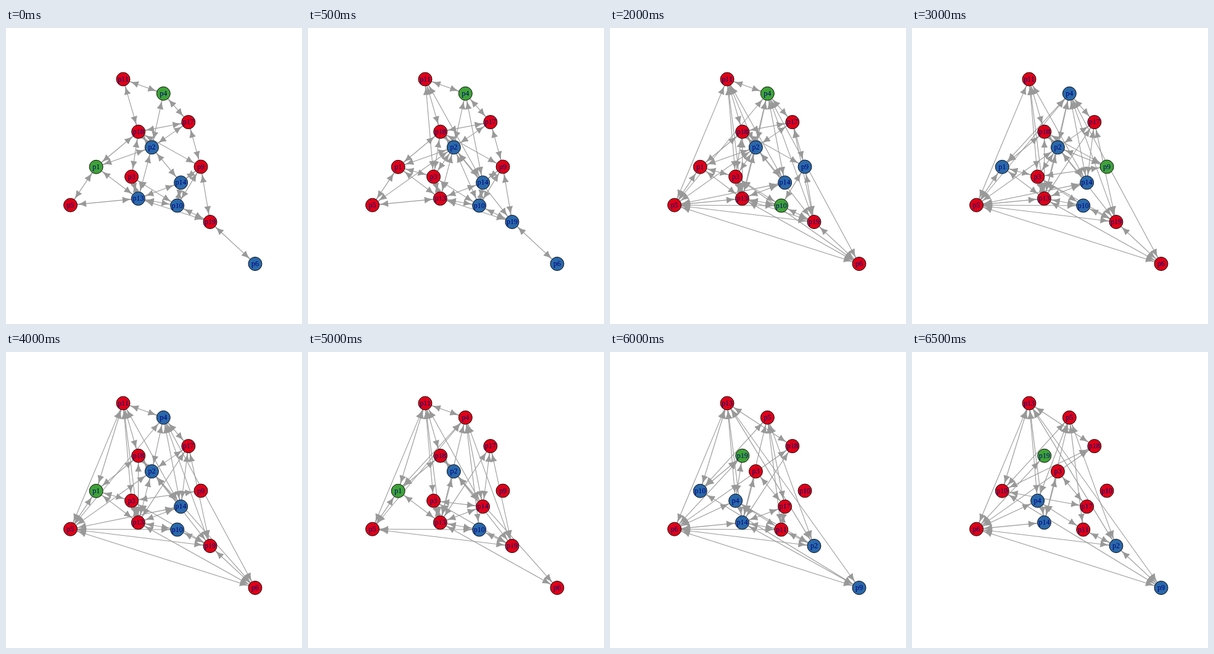
Recreate the animation shown at these times as an HTML page with a canvas. Size 480 px wide and 480 px high, loop 7 s.

```html
<!DOCTYPE html>
<html lang="en">
<head>
<meta charset="utf-8">
<title>Changing network</title>
<style>
html, body { margin: 0; width: 100%; height: 100%; overflow: hidden; background: #fff; }
canvas { display: block; width: 480px; height: 480px; }
</style>
</head>
<body>
<canvas id="stage" width="480" height="480"></canvas>
<script>
const ctx = document.getElementById('stage').getContext('2d');
const STEP = 500;
const RADIUS = 11;
const HEAD = { length: 14, half: 4.6 };
const COLORS = { r: '#df0017', g: '#3ea336', b: '#2a68aa' };
const GREY = '#999';

// Node places, keyed A to N.
const places = {
  A: [190, 83], B: [255.3, 106.3], C: [295.8, 152.6], D: [214.7, 168.2],
  E: [236.4, 193.6], F: [146.2, 225.3], G: [316, 225], H: [203.6, 241.2],
  I: [283.6, 250.7], J: [214.4, 276.6], K: [277.7, 288], L: [104.5, 287.2],
  M: [331, 314.5], N: [404, 382.4]
};
const keys = Object.keys(places);

const firstLabels = [11, 4, 17, 18, 2, 1, 9, 3, 14, 13, 10, 5, 19, 6];
const lateLabels = [13, 5, 18, 19, 3, 10, 10, 4, 17, 14, 11, 6, 2, 9];
const RELABEL_STEP = 11;

// Each step adds links, cuts links and repaints nodes.
const steps = [
  { add: 'AB AD BC BE CD CE CG DG DF DE DH EF FJ FL JL EJ EI HJ HK IJ JK JM IK GI GK GM KM MN',
    paint: 'Ar Bg Cr Dr Eb Fg Gr Hr Ib Jb Kb Lr Mr Nb' },
  { add: 'EL EH EK AH AI BI EM FH', paint: 'Fr Jr Mb' },
  { add: 'BL AJ BG BM DJ EN KL LN', cut: 'GI GK', paint: 'Bb Kg' },
  { add: 'AL BJ CM IL LM GK', cut: 'BG EK IK', paint: 'Bg Mr' },
  { add: 'AE BN JN HN', cut: 'EN', paint: 'Gb Nr' },
  { add: 'BF CI EG', cut: 'AB CG GK JM EF', paint: 'Bb Fb' },
  { add: 'CJ GH HM', cut: 'CD GM DH AE HN', paint: 'Gg Kb' },
  { add: 'AB AF EN', cut: 'BF BJ EG DG', paint: 'Fg Gr' },
  { cut: 'EH JL HK' },
  { add: 'HI BF', cut: 'BN LN EL MN DJ FH' },
  { add: 'BJ BK', cut: 'IL GH CE BE BC', paint: 'Br Ir' },
  { add: 'AC AM DL CL HK HL DH FN IK', cut: 'AB AD AH BL FJ FL EM HJ',
    paint: 'Dg Er Fb Gb Hg Jb Kr Mb Nb' },
  { add: 'JL LN AN AH', cut: 'AI CI CM DE EN HI', paint: 'Hb Gr' },
  { add: 'BH CF FI MN', cut: 'BI CJ DF DH HM JN IJ JK IK KL', paint: 'Fr' }
];

const words = text => text ? text.split(' ') : [];

function buildScenes() {
  const links = new Set();
  const paint = {};
  return steps.map((step, i) => {
    words(step.cut).forEach(link => links.delete(link));
    words(step.add).forEach(link => links.add(link));
    words(step.paint).forEach(([key, color]) => { paint[key] = color; });
    return {
      links: [...links],
      paint: { ...paint },
      labels: i < RELABEL_STEP ? firstLabels : lateLabels
    };
  });
}

function drawHead(x, y, angle) {
  const { length, half } = HEAD;
  ctx.save();
  ctx.translate(x, y);
  ctx.rotate(angle);
  ctx.beginPath();
  ctx.moveTo(0, 0);
  ctx.quadraticCurveTo(-length / 2, 0, -length, half);
  ctx.lineTo(-length, -half);
  ctx.quadraticCurveTo(-length / 2, 0, 0, 0);
  ctx.fill();
  ctx.stroke();
  ctx.restore();
}

function drawLink([from, to]) {
  const [x1, y1] = places[from];
  const [x2, y2] = places[to];
  const angle = Math.atan2(y2 - y1, x2 - x1);
  const dx = RADIUS * Math.cos(angle);
  const dy = RADIUS * Math.sin(angle);
  ctx.beginPath();
  ctx.moveTo(x1 + dx, y1 + dy);
  ctx.lineTo(x2 - dx, y2 - dy);
  ctx.stroke();
  drawHead(x1 + dx, y1 + dy, angle + Math.PI);
  drawHead(x2 - dx, y2 - dy, angle);
}

function drawNode(key, color, label) {
  const [x, y] = places[key];
  ctx.beginPath();
  ctx.arc(x, y, RADIUS, 0, Math.PI * 2);
  ctx.fillStyle = COLORS[color];
  ctx.fill();
  ctx.strokeStyle = '#111';
  ctx.stroke();
  ctx.fillStyle = '#00007b';
  ctx.fillText('p' + label, x, y + 3.7);
}

function drawScene({ links, paint, labels }) {
  ctx.fillStyle = '#fff';
  ctx.fillRect(0, 0, 480, 480);
  ctx.lineWidth = 1.1;
  ctx.lineJoin = 'round';
  ctx.strokeStyle = ctx.fillStyle = GREY;
  links.forEach(drawLink);
  ctx.lineWidth = 1;
  ctx.font = '12px "Liberation Serif", serif';
  ctx.textAlign = 'center';
  keys.forEach((key, i) => drawNode(key, paint[key], labels[i]));
}

const scenes = buildScenes();
const start = performance.now();

function tick() {
  const elapsed = Math.max(0, performance.now() - start);
  drawScene(scenes[Math.floor(elapsed / STEP) % scenes.length]);
  requestAnimationFrame(tick);
}
tick();
</script>
</body>
</html>
```
